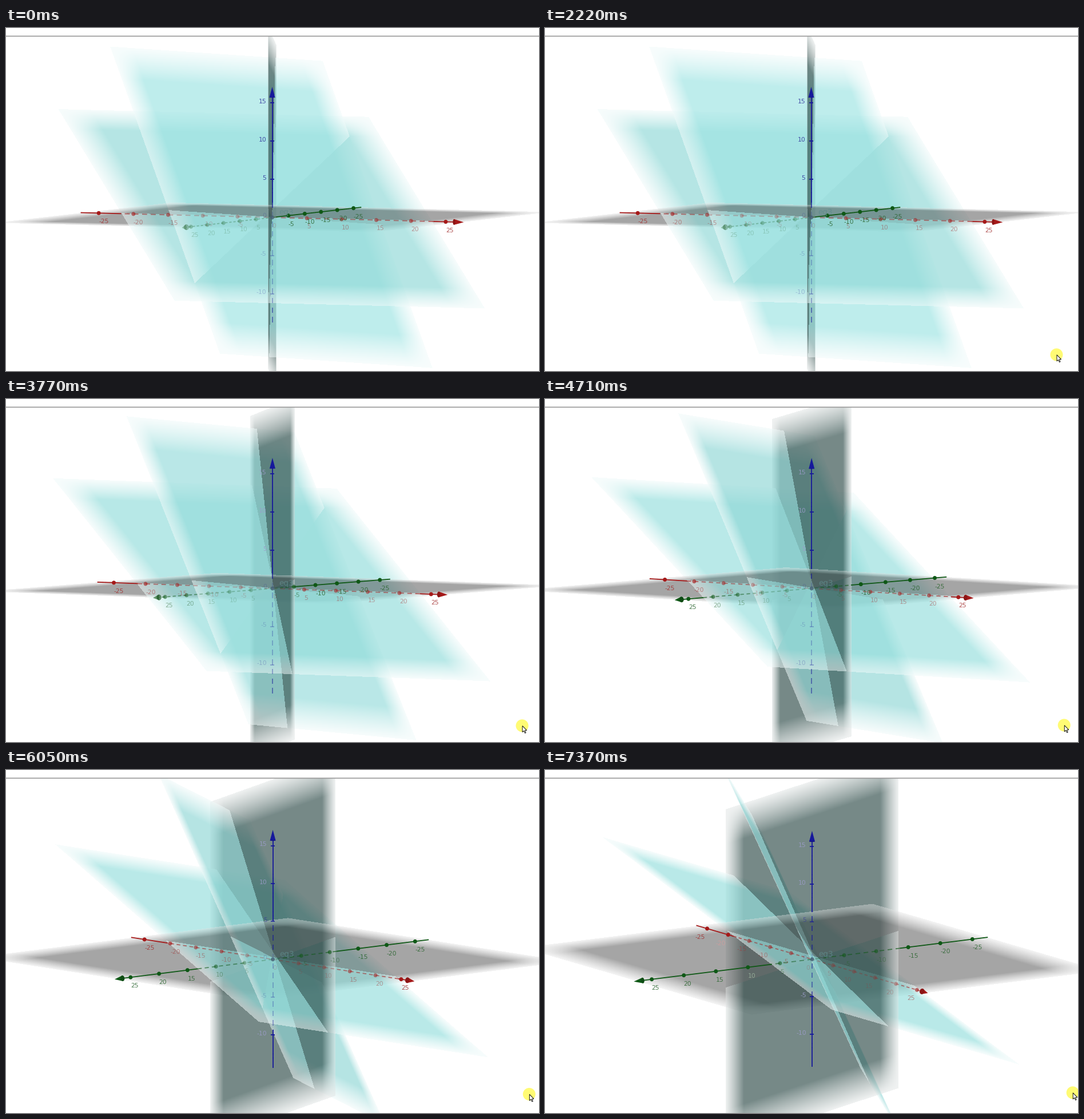
Recreate the animation shown at these times as a matplotlib script. Size 932 px wide and 601 px high, loop 8000 ms.

```python
import numpy as np
import matplotlib.pyplot as plt
from matplotlib.animation import FuncAnimation
from matplotlib.collections import LineCollection, PolyCollection
from matplotlib.patches import Circle, Polygon

W, H, DPI = 932, 601, 100
STEP, FRAMES = 50, 160
PX = 72 / DPI                      # one pixel in points
UNIT = 13.4                        # pixels per world unit
TOP = 14
MID_Y = 313.2
CENTER = np.array([0, 0, 1.4])
FADE, EDGE = 0.21, 0.14


def rgb(*c):
    return np.array(c, np.float32) / 255


# Moments at which the picture changes: (first, last, number of steps)
SPANS = [(0, 0, 1), (200, 840, 9), (1210, 1210, 1), (1670, 1670, 1),
         (2610, 2700, 2), (2840, 3230, 6), (3770, 3770, 1), (3940, 4560, 9),
         (4710, 4890, 3), (5110, 5200, 2), (5720, 5810, 2), (5950, 6610, 8),
         (6960, 7370, 6)]
CHANGES = np.concatenate([np.linspace(*s) for s in SPANS])

TURN_T = [2600, 2610, 2700, 2840, 3230, 3770, 4560, 4710, 4890, 5110, 5200,
          5720, 5810, 5950, 6050, 6610, 6960, 7370]
TURN = [25.1, 26.1, 27, 28, 33, 34.1, 39.2, 40, 42, 43, 44,
        45, 46, 47, 48, 53, 54, 56.8]
TILT_T = [3770, 4560, 4710, 5200, 5810, 6050, 6610]
TILT = [3.07, 4, 4.1, 5.6, 7.2, 8.08, 11.05]


class Plane:
    """Square in space that pales to white towards its edges."""

    def __init__(self, e1, e2, half, color, alpha, through=(0, 0, 1)):
        self.e1 = np.array(e1) / np.linalg.norm(e1)
        self.e2 = np.array(e2) / np.linalg.norm(e2)
        self.n = np.cross(self.e1, self.e2)
        off = CENTER - np.array(through)
        self.p = CENTER - self.n * (self.n @ off)
        self.half, self.color, self.alpha = half, rgb(*color), alpha

    def facing(self, v):
        d = self.n @ v
        return d if abs(d) > 1e-3 else 1e-3

    def shade(self, a, b):
        """Opacity and strength of colour at plane coordinates a, b."""
        ga, gb = 1 - np.abs(a), 1 - np.abs(b)
        inside = (ga > 0) & (gb > 0)
        ramp = np.clip(ga / FADE, 0, 1) * np.clip(gb / FADE, 0, 1)
        tint = EDGE + (1 - EDGE) * ramp
        return self.alpha * inside * (0.75 + 0.25 * tint), tint


R = 22.36
FLOOR = Plane((1, 0, 0), (0, 1, 0), 27.3, (75, 75, 75), 0.5, (0, 0, 0))
WALL = Plane((1, 2, 0), (0, 0, 1), R, (35, 66, 63), 0.62)
STEEP = Plane((2, 1, 0), (1, -2, -5), R, (157, 228, 227), 0.66)
SLOPE = Plane((1, 0, 0), (0, 4, 3), R, (143, 217, 215), 0.66)
PLANES = [FLOOR, WALL, STEEP, SLOPE]


class View:
    """Parallel projection, looking up from slightly below the floor."""

    def __init__(self, turn, tilt):
        th, ph = np.radians([turn, tilt])
        c, s = np.cos(th), np.sin(th)
        self.turn = turn
        self.right = np.array([c, -s, 0])
        self.up = np.array([-s * np.sin(ph), -c * np.sin(ph), np.cos(ph)])
        self.v = np.cross(self.right, self.up)     # towards the eye
        self.mid = np.array([465.5 + 1.4 * (turn - 25) / 30, MID_Y])

    def project(self, pts):
        q = np.asarray(pts) - CENTER
        return self.mid + UNIT * np.stack(
            [q @ self.right, -(q @ self.up)], axis=-1)

    def clearness(self, pts):
        """Share of light that reaches the eye from each point."""
        pts = np.asarray(pts, float)
        out = np.ones(len(pts))
        for pl in PLANES:
            t = (pl.p - pts) @ pl.n / pl.facing(self.v)
            rel = (pts + t[:, None] * self.v - pl.p) / pl.half
            a, _ = pl.shade(rel @ pl.e1, rel @ pl.e2)
            out *= np.where(t > 0.3, 1 - a, 1)
        return out

    def render(self):
        X = ((np.arange(W) + 0.5 - self.mid[0]) / UNIT).astype(np.float32)
        Y = ((self.mid[1] - np.arange(TOP, H) - 0.5) / UNIT)
        X, Y = X[None, :], Y.astype(np.float32)[:, None]

        def affine(k0, kx, ky):
            return (np.float32(k0) + np.float32(kx) * X) + np.float32(ky) * Y

        depth, alpha, tint = [], [], []
        for pl in PLANES:
            f = pl.facing(self.v)
            off = CENTER - pl.p
            t = np.array([-(pl.n @ k) / f for k in (off, self.right, self.up)])
            depth.append(affine(*t))
            ab = []
            for e in (pl.e1, pl.e2):
                k = np.array([e @ off, e @ self.right, e @ self.up])
                ab.append(affine(*((k + t * (e @ self.v)) / pl.half)))
            a, s = pl.shade(*ab)
            alpha.append(a.astype(np.float32))
            tint.append(s.astype(np.float32))

        light = list(alpha)
        for i in range(4):
            for j in range(i):
                front = depth[i] > depth[j]
                light[j] = light[j] * (1 - alpha[i] * front)
                light[i] = light[i] * (1 - alpha[j] * ~front)

        # the light shifts a little between the two tinted planes
        k = np.clip((self.turn - 25) / 15, 0, 1)
        shift = {STEEP: -13 * k / 255, SLOPE: 6 * k / 255}
        img = np.ones((H, W, 3), np.float32)
        for pl, w, s in zip(PLANES, light, tint):
            amount = w * s
            for ch in range(3):
                dark = 1 - pl.color[ch] - np.float32(shift.get(pl, 0))
                img[TOP:, :, ch] -= amount * dark
        img[13], img[14], img[15] = 0.8, 0.6, img[15] * 0.93
        return np.clip(img, 0, 1)


AXES = [(np.array([1, 0, 0]), -27.6, 27.6, rgb(165, 25, 25)),
        (np.array([0, 1, 0]), -27.4, 27.8, rgb(15, 88, 22)),
        (np.array([0, 0, 1]), -14.3, 17.1, rgb(22, 24, 155))]
DASH, PERIOD, CONE = 0.72, 1.25, 1.4

fig = plt.figure(figsize=(W / DPI, H / DPI), dpi=DPI, facecolor="white")
ax = fig.add_axes([0, 0, 1, 1])
ax.set_xlim(0, W)
ax.set_ylim(H, 0)
ax.axis("off")
picture = ax.imshow(np.ones((H, W, 3)), extent=(0, W, H, 0), aspect="auto",
                    interpolation="nearest")
lines = ax.add_collection(LineCollection([], linewidths=1.8 * PX, zorder=2))
dots = ax.scatter([], [], s=(7 * PX) ** 2, linewidths=0, zorder=3)
cones = ax.add_collection(PolyCollection([], linewidths=0, zorder=4))

labels = []                        # (axis index, value, text artist)
for i, marks in enumerate([range(-25, 26, 5),
                           [s for s in range(-25, 26, 5) if s],
                           range(-10, 16, 5)]):
    for s in marks:
        labels.append((i, s, ax.text(
            0, 0, str(s), fontsize=10.8 * PX, family="DejaVu Sans",
            va="center", ha="right" if i == 2 else "left", zorder=5)))
name = ax.text(0, 0, "eq3", fontsize=13.5 * PX, family="DejaVu Sans",
               color=rgb(95, 140, 140), alpha=0.75, va="center", ha="center",
               zorder=5)

spot = ax.add_patch(Circle((0, 0), 11, fc=rgb(255, 250, 70), lw=0, alpha=0.75,
                           zorder=6))
ARROW = np.array([(0, 0), (0, 11), (2.6, 8.7), (4.4, 12.8), (6, 12.1),
                  (4.3, 8.1), (7.6, 7.9)])
pointer = ax.add_patch(Polygon(ARROW, fc="white", ec="black", lw=0.9 * PX,
                               zorder=7))


def tinted(color, alpha):
    return np.append(color, alpha)


def draw_axes(view):
    segs, seg_cols, polys, poly_cols = [], [], [], []
    for i, (d, lo, hi, col) in enumerate(AXES):
        starts = np.arange(np.floor(lo / PERIOD), hi / PERIOD) * PERIOD
        a = np.concatenate([starts, starts + DASH])
        b = np.concatenate([starts + DASH, starts + PERIOD])
        is_dash = np.arange(len(a)) < len(starts)
        a, b = np.clip(a, lo, hi - CONE), np.clip(b, lo, hi - CONE)
        clear = view.clearness(((a + b) / 2)[:, None] * d)
        for p, q, dash, k in zip(a, b, is_dash, clear):
            if q > p and (dash or k > 0.9):
                ends = np.outer([p, q + 0.03 * (k > 0.9)], d)
                segs.append(view.project(ends))
                seg_cols.append(tinted(col, k ** 0.6))

        tip, base = view.project([hi * d, (hi - CONE) * d])
        along = (tip - base) / max(np.hypot(*(tip - base)), 1e-6)
        side = np.array([-along[1], along[0]])
        flat = abs(d @ view.v)
        u = np.linspace(0, 2 * np.pi, 25)
        ring = base + 5 * (np.outer(np.sin(u), side)
                           + flat * np.outer(np.cos(u), along))
        k = view.clearness([(hi - CONE / 2) * d])[0] ** 0.6
        polys += [np.array([tip, base + 5 * side, base - 5 * side]), ring]
        poly_cols += [tinted(col, k), tinted(col * 0.85, k)]

    where, dot_cols = [view.project([0, 0, 0])], [tinted(rgb(70, 95, 115), .8)]
    wall_half = abs(WALL.e1 @ view.right) * R * UNIT
    for i, s, text in labels:
        d, _, _, col = AXES[i]
        clear = view.clearness([s * d])[0]
        x, y = view.project(s * d)
        shade = tinted(col, clear ** 0.6)
        if i == 2:
            if s:
                segs.append([(x - 3.5, y), (x + 3.5, y)])
                seg_cols.append(shade)
            text.set_position((x - 10, y - 2.5))
        else:
            if s:
                where.append((x, y))
                dot_cols.append(shade)
            flip = i == 0 and view.turn > 52.5
            text.set_ha("right" if flip else "left")
            text.set_position((x - 4 if flip else x, y + 15))
        over = (view.turn > 30 and clear > 0.9
                and abs(x - view.mid[0]) < wall_half)
        text.set_color(col * 0.35 + 0.58 if over else col * 0.8 + 0.12)
        text.set_alpha(0.85 * clear ** 0.6)

    lines.set_segments(segs)
    lines.set_color(seg_cols)
    dots.set_offsets(where)
    dots.set_facecolor(dot_cols)
    cones.set_verts(polys)
    cones.set_facecolor(poly_cols)
    ox, oy = view.project([0, 0, 0])
    name.set_position((ox + 24.5, oy - 9))


def pointer_at(t, turn, tilt):
    if t < 1210:
        return np.array([np.interp(t, [200, 840], [876, 891.5]),
                         np.interp(t, [200, 840], [597, 572])])
    return np.array([895 + (turn - 25.1) * 0.89, 572.7 - (tilt - 3.07) * 0.88])


shown = {}


def update(i):
    now = i * STEP + STEP / 2
    t = CHANGES[CHANGES <= now].max()
    turn, tilt = np.interp(t, TURN_T, TURN), np.interp(t, TILT_T, TILT)
    if shown.get("angles") != (turn, tilt):
        shown["angles"] = (turn, tilt)
        view = View(turn, tilt)
        picture.set_data(view.render())
        draw_axes(view)
    tip = pointer_at(t, turn, tilt)
    pointer.set_xy(ARROW + tip)
    pointer.set_visible(t >= 200)
    spot.center = tip - (0.5, 0.3)
    spot.set_visible(t >= 1670)
    return picture, lines, dots, cones, spot, pointer


anim = FuncAnimation(fig, update, frames=FRAMES, interval=STEP, repeat=True,
                     repeat_delay=0, blit=False)
plt.show()
```
